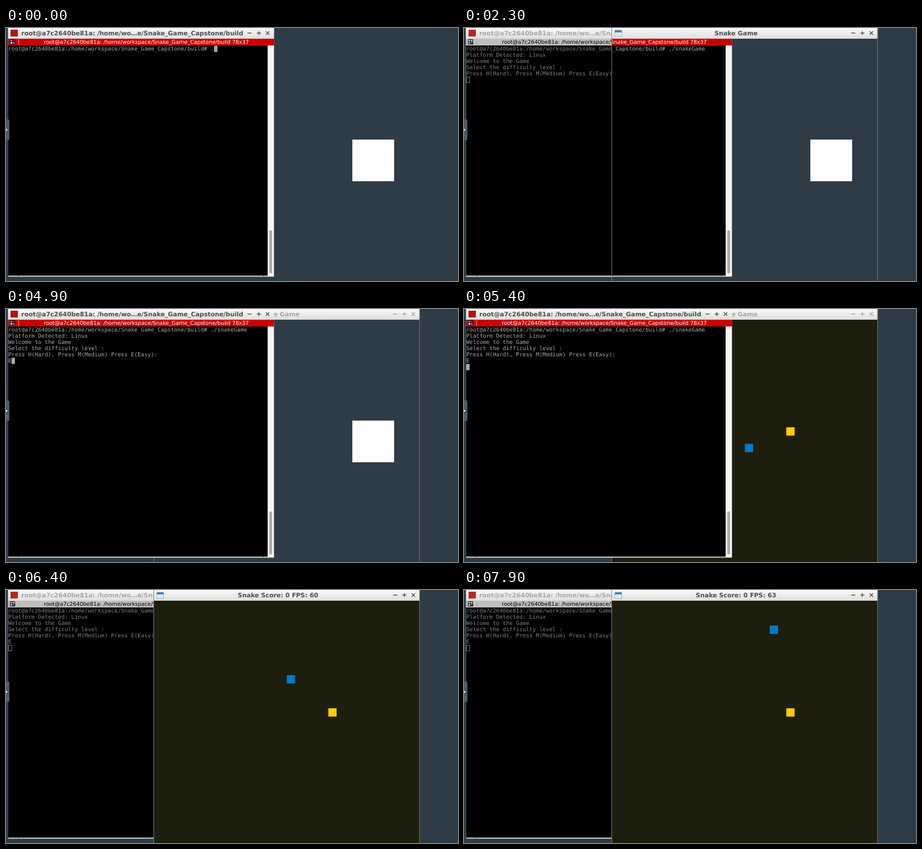
An HTML page that plays this animation: 800x449 px, repeating every 8000 ms.

```html
<!DOCTYPE html>
<html lang="en">
<head>
<meta charset="utf-8">
<title>Snake in a terminal</title>
<style>
  html, body { margin: 0; width: 100%; height: 100%; overflow: hidden; background: #2e3c47; }
  svg { display: block; width: 800px; height: 449px; }
  text { white-space: pre; text-rendering: geometricPrecision; font-kerning: none; }
  .title { font: bold 10.95px "DejaVu Sans", sans-serif; }
  .bar { font: 9.48px "DejaVu Sans", sans-serif; }
  .mono { font: 9.758px "DejaVu Sans Mono", monospace; }
</style>
</head>
<body>
<svg viewBox="0 0 800 449">
  <defs>
    <linearGradient id="chrome" x2="0" y2="1">
      <stop stop-color="#f9f9f9"/>
      <stop offset="1" stop-color="#dedede"/>
    </linearGradient>
    <clipPath id="left"><path d="M0 0H262V449H0Z"/></clipPath>
  </defs>
  <g id="stage"></g>
</svg>
<script>
const LOOP = 8000;
const CELL = 14.6875;
const CHAR = 5.875;
const ROW = 11;
const GAME = { x: 262, y: 19, w: 470 };
const TERM = { x: 3.7, w: 470.6 };
const GRID = { x: 4, y: 31.5 };

const HOST = 'root@a7c2640be81a:';
const PATH = '/home/workspace/Snake_Game_Capstone/build';
const PROMPT = HOST + PATH + '# ';
const OUTPUT = [
  'Platform Detected: Linux',
  'Welcome to the Game',
  'Select the difficulty level :',
  'Press H(Hard), Press M(Medium) Press E(Easy):'
];
const TYPING = [[0, '.'], [400, './'], [1000, './s'], [1300, './snakeGame ']];

const rect = (x, y, w, h, fill, extra = '') =>
  `<rect x="${x}" y="${y}" width="${w}" height="${h}" fill="${fill}" ${extra}/>`;
const line = (d, color, width = 1) =>
  `<path d="${d}" fill="none" stroke="${color}" stroke-width="${width}"/>`;
const text = (cls, x, y, fill, str, anchor = 'start') =>
  `<text class="${cls}" x="${x}" y="${y}" fill="${fill}" text-anchor="${anchor}">${str}</text>`;

const latest = (steps, t) => steps.filter(([at]) => at <= t).pop()[1];
const inkFor = focused => focused ? '#4d4d4d' : '#a8a8a8';

function buttons(xs, ink) {
  const [min, max, close] = xs;
  return line(`M${min - 3.5} 9H${min + 3.5}M${max - 3.5} 9H${max + 3.5}M${max} 5.5V12.5` +
    `M${close - 3} 6L${close + 3} 12M${close + 3} 6L${close - 3} 12`, ink, 1.4);
}

function groupIcon(active) {
  if (active) {
    return rect(7, 20, 9, 9, '#1a0508') + rect(8, 21, 3, 3, '#4f9be0') +
      rect(12, 21, 3, 3, '#c80000') + rect(8, 25, 3, 3, '#e8e8f0') +
      rect(12, 25, 3, 3, '#4f9be0') + line('M22.5 20V30', '#e9a0a0');
  }
  return line('M7.5 20.5H15.5V28.5H7.5ZM11.5 20.5V28.5M7.5 24.5H15.5', '#111') +
    '<path d="M12 26h5l-2.5 3.5z" fill="#111"/>' + line('M22.5 20V30', '#aaa');
}

function terminal({ focused, active, lines, cursor, hollow }) {
  const ink = inkFor(focused);
  const shade = active ? '#a9a9a9' : '#7f7f7f';
  const [col, row] = cursor;
  const cx = GRID.x + col * CHAR, cy = GRID.y + row * ROW;
  return rect(TERM.x, 0, TERM.w, 441.3, '#e6e6e4') +
    rect(TERM.x, 0, TERM.w, 19, 'url(#chrome)') +
    rect(8, 3, 13, 12, focused ? '#ad1714' : '#b52a27') +
    text('title', 27, 13, ink, HOST + ' /home/wo…e/Snake_Game_Capstone/build') +
    buttons([431, 447.5, 463], ink) +
    rect(TERM.x, 19, TERM.w, 12, active ? '#c80000' : '#c0bfbd') +
    groupIcon(active) +
    text('bar', 67, 28, active ? '#fff' : '#000', HOST + ' ' + PATH + ' 78x37') +
    rect(TERM.x, 31, 463.3 - TERM.x, 408.5, '#000') +
    rect(463.3, 31, 10.7, 408.5, '#f6f5f4') +
    rect(466, 359, 5, 76.5, '#adadad', 'rx="2.5"') +
    line('M22.5 439.5V441.3M455.5 439.5V441.3', '#555') +
    lines.map((s, i) => text('mono', GRID.x, GRID.y + 8.8 + i * ROW, shade, s)).join('') +
    (hollow ? rect(cx + .4, cy + .5, 5.4, 10, 'none', `stroke="${shade}"`)
            : rect(cx, cy, CHAR, ROW, '#aaa'));
}

function gameTitle(label, focused) {
  const ink = inkFor(focused);
  return rect(GAME.x, 0, GAME.w, 19, 'url(#chrome)') +
    line('M261.5 0V19M732 0V19', '#8b9092') +
    rect(267, 4, 12, 11, '#f2f4f5', 'stroke="#8496a4" stroke-width=".8"') +
    rect(267, 4, 12, 4, '#4d86b4') + rect(269, 10, 8, 3, '#dbe0e3') +
    text('title', 481.5, 13, ink, label, 'middle') +
    buttons([689, 705, 721], ink);
}

const edges = () => line('M261.5 19V449M732 19V449', '#767b7e');

function board(t) {
  const cell = (x, y, fill) => rect(GAME.x + x * CELL, GAME.y + y * CELL, CELL, CELL, fill);
  const n = Math.floor((t - 5350) / (1000 / 6));
  const up = Math.min(n, 12);
  return rect(GAME.x, GAME.y, GAME.w, 430, '#1e1e0e') +
    cell(21, 13, '#ffcc00') + cell(16 + n - up, 15 - up, '#007acc');
}

function desktop() {
  return rect(0, 0, 800, 449, '#2e3c47') + rect(613, 198, 74, 74, '#fdfdfd');
}

function sideHandle() {
  return '<path d="M0 162H3Q6 162 6 165V196Q6 199 3 199H0Z" fill="#4b5a69"/>' +
    '<path d="M0 178.8L3 180.8L0 182.8Z" fill="#fff"/>' +
    line('M2.5 168V169M2.5 171V172M2.5 189V190M2.5 192V193', '#8592a0');
}

function terminalState(t) {
  const command = latest(TYPING, t);
  const lines = [PROMPT + command];
  let cursor = [lines[0].length, 0];
  if (t >= 1900) cursor = [0, 1];
  if (t >= 2100) {
    lines.push(...OUTPUT);
    cursor = [0, 5];
  }
  if (t >= 4900) {
    lines.push('E');
    cursor = t < 5400 ? [1, 5] : [0, 6];
  }
  const active = t < 2300 || (t >= 4000 && t < 6100);
  return {
    focused: t < 2000 || (t >= 3900 && t < 6400),
    active, lines, cursor,
    hollow: !active || t >= 5900
  };
}

function scene(t) {
  const state = terminalState(t);
  const front = terminal(state);
  if (t < 1900) return front;
  if (t < 3900) {
    // The empty game window still shows what was on screen before it opened.
    const stale = terminal({ focused: true, active: true, lines: [state.lines[0]], cursor: [0, 1] });
    return stale + `<g clip-path="url(#left)">${front}</g>` +
      edges() + gameTitle('Snake Game', t >= 2000);
  }
  const client = t < 5400 ? '' : board(t);
  if (t < 6300) return client + edges() + gameTitle('Snake Game', false) + front;
  if (t < 6400) return client + front + edges() + gameTitle('Snake Game', false);
  const fps = t < 7400 ? 60 : 63;
  return front + client + edges() + gameTitle('Snake Score: 0 FPS: ' + fps, true);
}

const stage = document.getElementById('stage');
const start = performance.now();
let shown = -1;

function tick() {
  const t = Math.floor((performance.now() - start) % LOOP / 100) * 100;
  if (t !== shown) {
    stage.innerHTML = desktop() + scene(t) + sideHandle();
    shown = t;
  }
  requestAnimationFrame(tick);
}
tick();
</script>
</body>
</html>
```
